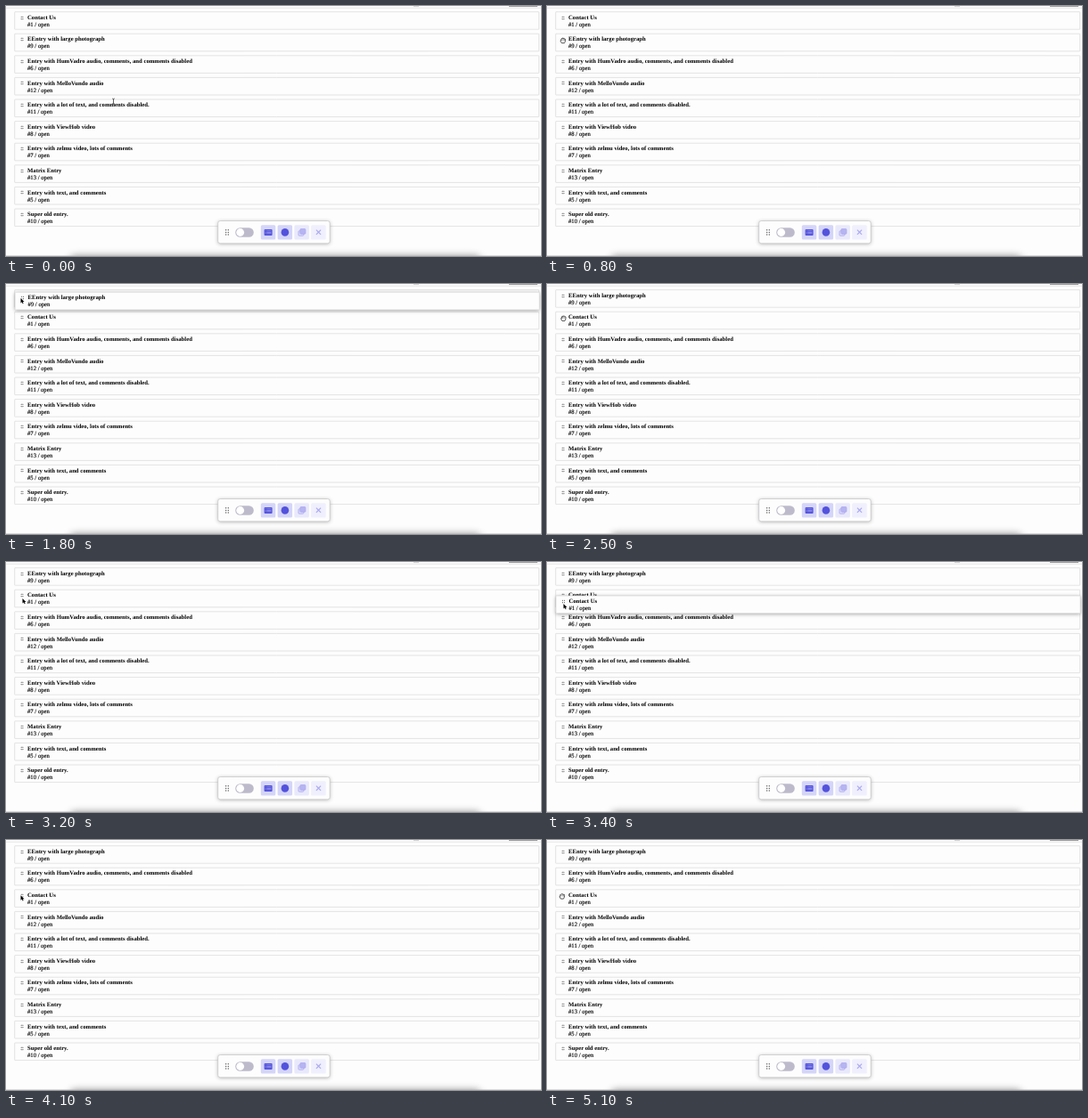
Animation, 600 px wide and 281 px high, one loop 5.6 s. Source, as an HTML page with a canvas:

```html
<!DOCTYPE html>
<html lang="en">
<head>
<meta charset="utf-8">
<title>Sortable entries</title>
<style>
html, body { margin: 0; width: 100%; height: 100%; overflow: hidden; background: #fdfdfd; }
canvas { display: block; width: 100vw; height: 100vh; }
</style>
</head>
<body>
<canvas id="stage"></canvas>
<script>
const W = 600, H = 281, LOOP = 5600, STEP = 100;
const ROW_TOP = 6.6, PITCH = 24.6, ROW_HEIGHT = 19.6;
const canvas = document.getElementById('stage');
const ctx = canvas.getContext('2d');

const entries = [
  ['Contact Us', 1],
  ['EEntry with large photograph', 9],
  ['Entry with HumVadro audio, comments, and comments disabled', 6],
  ['Entry with MelloVundo audio', 12],
  ['Entry with a lot of text, and comments disabled.', 11],
  ['Entry with ViewHob video', 8],
  ['Entry with zelmu video, lots of comments', 7],
  ['Matrix Entry', 13],
  ['Entry with text, and comments', 5],
  ['Super old entry.', 10]
];

// Each key: time, x, y, pointer shape
const pointerKeys = [
  [0, 120.5, 107, 'beam'], [300, 66, 72, 'beam'], [500, 26, 43, 'arrow'],
  [600, 18.5, 39, 'hand'], [1000, 17.5, 38.5, 'hand'], [1200, 16.5, 32, 'arrow'],
  [1300, 16.5, 20, 'arrow'], [1500, 16.5, 16, 'arrow'], [2100, 16.5, 16, 'arrow'],
  [2400, 18, 34, 'arrow'], [2500, 18.5, 38.5, 'hand'], [2900, 18.5, 39, 'hand'],
  [3200, 18.5, 41, 'arrow'], [3400, 18.5, 47, 'arrow'], [3500, 17.5, 55, 'arrow'],
  [3600, 16.5, 63, 'arrow'], [4600, 16.5, 61.5, 'arrow'], [4700, 17, 63.2, 'hand']
];

// Each drag: entry index, then keys of time, x offset, top; it vanishes after the last key
const drags = [
  [1, [[1200, 1, 27], [1300, 1, 14.9], [1400, .8, 11], [1500, .5, 9.3], [1800, .5, 9.3], [1900, .2, 7.4]]],
  [0, [[3300, .4, 34.5], [3400, .4, 38], [3500, -.4, 47], [3600, -1.2, 56.6], [3900, -1.2, 56.4], [4000, -.4, 56]]]
];

function sample(keys, t) {
  const i = Math.max(0, keys.findLastIndex(k => k[0] <= t));
  const a = keys[i], b = keys[i + 1] || a;
  const p = a === b ? 0 : (t - a[0]) / (b[0] - a[0]);
  return [a[1] + (b[1] - a[1]) * p, a[2] + (b[2] - a[2]) * p, a[3]];
}

function listOrder(t) {
  if (t < 1300) return [0, 1, 2, 3, 4, 5, 6, 7, 8, 9];
  return (t < 3500 ? [1, 0, 2] : [1, 2, 0]).concat([3, 4, 5, 6, 7, 8, 9]);
}

function box(x, y, w, h, r, fill, stroke, lineWidth = .6) {
  ctx.beginPath();
  ctx.roundRect(x, y, w, h, r);
  if (fill) { ctx.fillStyle = fill; ctx.fill(); }
  if (stroke) { ctx.strokeStyle = stroke; ctx.lineWidth = lineWidth; ctx.stroke(); }
}

function shadowBox(x, y, w, h, r, fill, shadow, blur, offsetY) {
  const scale = canvas.width / W;
  ctx.save();
  ctx.shadowColor = shadow;
  ctx.shadowBlur = blur * scale;
  ctx.shadowOffsetY = offsetY * scale;
  box(x, y, w, h, r, fill);
  ctx.restore();
}

function disc(x, y, r, fill) {
  box(x - r, y - r, 2 * r, 2 * r, r, fill);
}

function line(points, color, width) {
  ctx.beginPath();
  points.forEach(([x, y]) => ctx.lineTo(x, y));
  ctx.strokeStyle = color;
  ctx.lineWidth = width;
  ctx.stroke();
}

function text(string, x, y, weight = 'normal') {
  ctx.save();
  // A negligible skew keeps baselines from snapping to whole pixels
  ctx.transform(1, 1e-4, 0, 1, x, y);
  ctx.font = `${weight} 6.7px "Liberation Serif", serif`;
  ctx.fillStyle = ctx.strokeStyle = '#000';
  ctx.fillText(string, 0, 0);
  if (weight === 'normal') {
    ctx.lineWidth = .14;
    ctx.strokeText(string, 0, 0);
  }
  ctx.restore();
}

function drawRow([title, id], dx, top, lifted) {
  const area = [9.7 + dx, top, 588, ROW_HEIGHT, .4];
  if (lifted) shadowBox(...area, '#fdfdfd', 'rgba(0,0,0,.38)', 4.5, .9);
  box(...area, '#fdfdfd', '#d2d2d2');
  text('::', 16.2 + dx, top + 8);
  text(title, 24 + dx, top + 8.1, 'bold');
  text(`#${id} / open`, 24 + dx, top + 16.1);
}

function drawPageEdges() {
  box(0, 1.8, W, .6, 0, '#dedede');
  box(457, 0, 6, .6, 0, '#bbb');
  box(564, 0, 32, .7, 0, '#777');
  shadowBox(72, 281, 460, 20, 5, '#aaa', 'rgba(0,0,0,.45)', 9, 0);
  box(0, 280.4, W, .6, 0, '#bbb');
}

function drawToolbar() {
  const panel = [237.7, 241.5, 125.5, 25.3, 2.5];
  shadowBox(...panel, '#fdfdfd', 'rgba(0,0,0,.3)', 4.5, .8);
  box(...panel, '#fdfdfd', '#b9b9bd');
  for (let i = 0; i < 6; i++) disc(246.6 + i % 2 * 2.7, 251.7 + (i >> 1) * 2.7, .75, '#666');

  box(257.2, 249.2, 20.6, 10.6, 5.3, '#bdbbcb');
  disc(262.7, 254.5, 4.4, '#fff');

  ['#d4d5f8', '#d4d5f8', '#e9e9fc', '#efeffd'].forEach((fill, i) =>
    box(285.8 + i * 18.8, 246.2, 16.5, 16.3, 1.6, fill));

  box(289.6, 251.1, 9, 6.8, .9, '#5352dc');
  for (let i = 0; i < 3; i++) {
    box(290.7, 252.6 + i * 1.5, .8, .5, 0, '#b9b9f3');
    box(292.4, 252.6 + i * 1.5, 5, .5, 0, '#b9b9f3');
  }

  disc(312.9, 254.4, 4.3, '#5352dc');

  const pale = '#aaa8ef';
  box(328, 252.8, 5.8, 5.4, .8, '#dcdbf9', pale, .8);
  box(329.9, 250.6, 6, 5.6, .8, '#b7b5f1', pale, .8);
  line([[347.9, 251.7], [353.1, 256.9]], pale, 1.2);
  line([[353.1, 251.7], [347.9, 256.9]], pale, 1.2);
}

const pointers = {
  beam() {
    line([[-1.3, -3], [0, -2.4], [1.3, -3]], '#222', .7);
    line([[0, -2.4], [0, 2.4]], '#222', .7);
    line([[-1.3, 3], [0, 2.4], [1.3, 3]], '#222', .7);
  },
  arrow() {
    const outline = new Path2D('M0 0V5.4L1.3 4.3 2.2 6.2 3.1 5.8 2.3 3.9H4Z');
    ctx.lineWidth = .8;
    ctx.strokeStyle = '#fff';
    ctx.stroke(outline);
    ctx.fillStyle = '#000';
    ctx.fill(outline);
  },
  hand() {
    const outline = new Path2D('M-1.6 2.9L-2.8 .6Q-3 -.5 -2 0L-2.1 -1.6Q-1.6 -2.6 -1 -1.8Q-.5 -3.3 .3 -2.1Q1.1 -3 1.6 -1.7Q2.7 -2.1 2.6 -.7L2.2 1.6 1.5 2.9Z');
    ctx.fillStyle = '#fff';
    ctx.fill(outline);
    ctx.strokeStyle = '#222';
    ctx.lineWidth = .75;
    ctx.stroke(outline);
    for (const x of [-1, .3, 1.5]) line([[x, -1.6], [x, .2]], '#444', .45);
  }
};

function drawPointer(t) {
  const [x, y, shape] = sample(pointerKeys, t);
  ctx.save();
  ctx.translate(x, y);
  pointers[shape]();
  ctx.restore();
}

function render(now) {
  const t = Math.floor(now % LOOP / STEP) * STEP;
  const ratio = window.devicePixelRatio || 1;
  canvas.width = Math.round(innerWidth * ratio);
  canvas.height = Math.round(innerHeight * ratio);
  ctx.setTransform(canvas.width / W, 0, 0, canvas.height / H, 0, 0);
  ctx.textRendering = 'geometricPrecision';
  ctx.fillStyle = '#fdfdfd';
  ctx.fillRect(0, 0, W, H);

  drawPageEdges();
  listOrder(t).forEach((entry, slot) => drawRow(entries[entry], 0, ROW_TOP + slot * PITCH));
  for (const [entry, keys] of drags) {
    if (t < keys[0][0] || t > keys.at(-1)[0]) continue;
    const [dx, top] = sample(keys, t);
    drawRow(entries[entry], dx, top, true);
  }
  drawToolbar();
  drawPointer(t);
}

const start = performance.now();
function tick() {
  render(performance.now() - start);
  requestAnimationFrame(tick);
}
tick();
</script>
</body>
</html>
```
